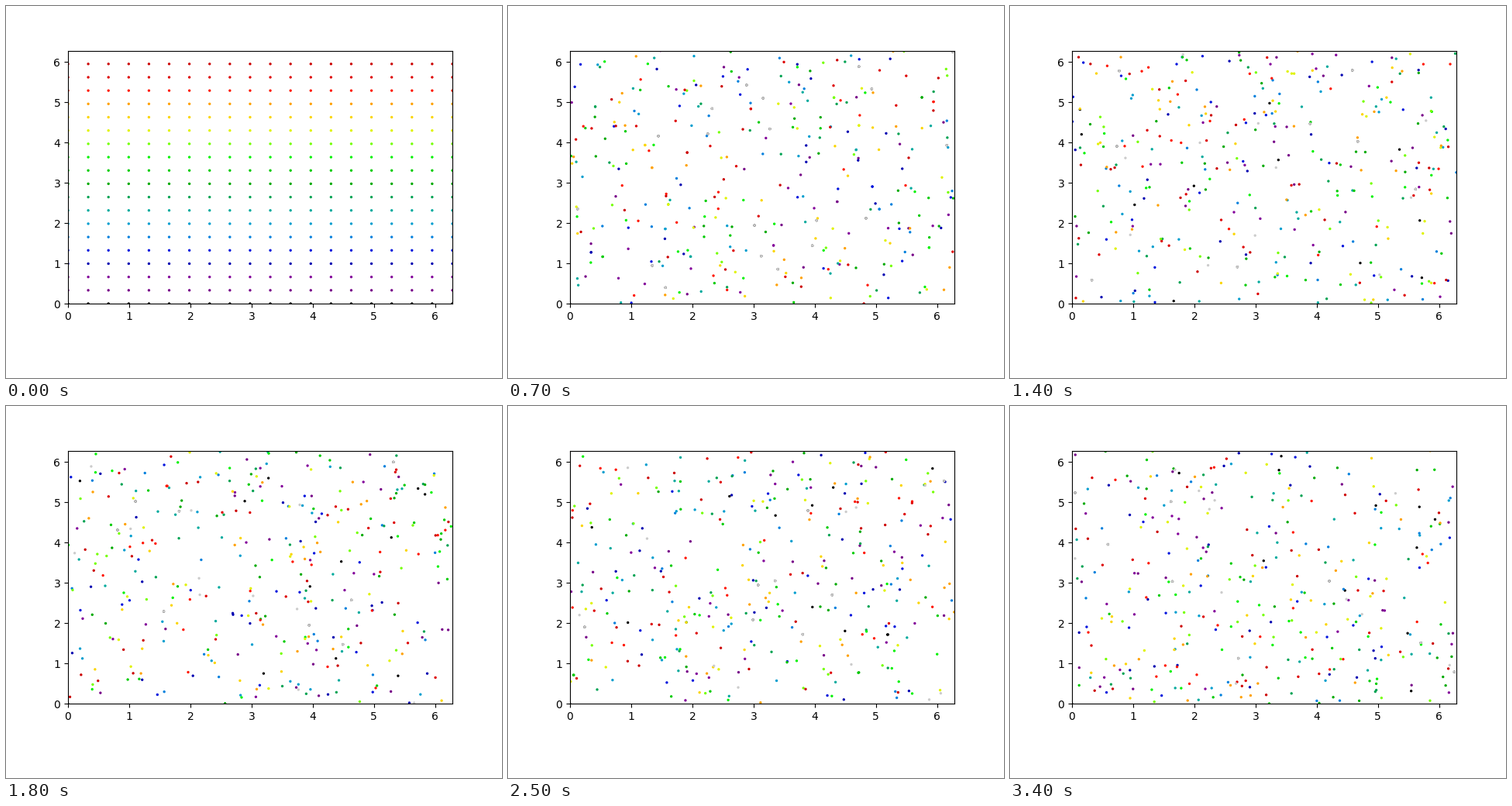
A matplotlib script for the animation above (3.5 s loop, 640 by 480 pixels).

```python
import math

import matplotlib.pyplot as plt
import numpy as np
from matplotlib.animation import FuncAnimation

# Chirikov standard map on a 20 x 20 grid of starting points
K = 100
N = 20
FRAMES = 35
TAU = 2 * np.pi

sin = np.vectorize(math.sin, otypes=[float])


def step(theta, p):
    # wrap only after both updates: rounding matters in a chaotic map
    p = p + K * sin(theta)
    theta = theta + p
    return theta % TAU, p % TAU


def orbit(theta, p, count):
    states = [(theta, p)]
    while len(states) < count:
        states.append(step(*states[-1]))
    return [np.column_stack(s) for s in states]


axis = np.linspace(0, TAU, N)
theta0, p0 = (g.ravel() for g in np.meshgrid(axis, axis))
states = orbit(theta0, p0, FRAMES)

fig, ax = plt.subplots(figsize=(6.4, 4.8), dpi=100)
fig.subplots_adjust(left=0.125, right=0.9, bottom=0.2, top=0.88)
ax.set_xlim(0, TAU)
ax.set_ylim(0, TAU)
dots = ax.scatter(theta0, p0, s=2, c=p0, cmap="nipy_spectral")


def update(i):
    dots.set_offsets(states[i])
    return (dots,)


anim = FuncAnimation(fig, update, frames=FRAMES, interval=100, repeat=True)
plt.show()
```
